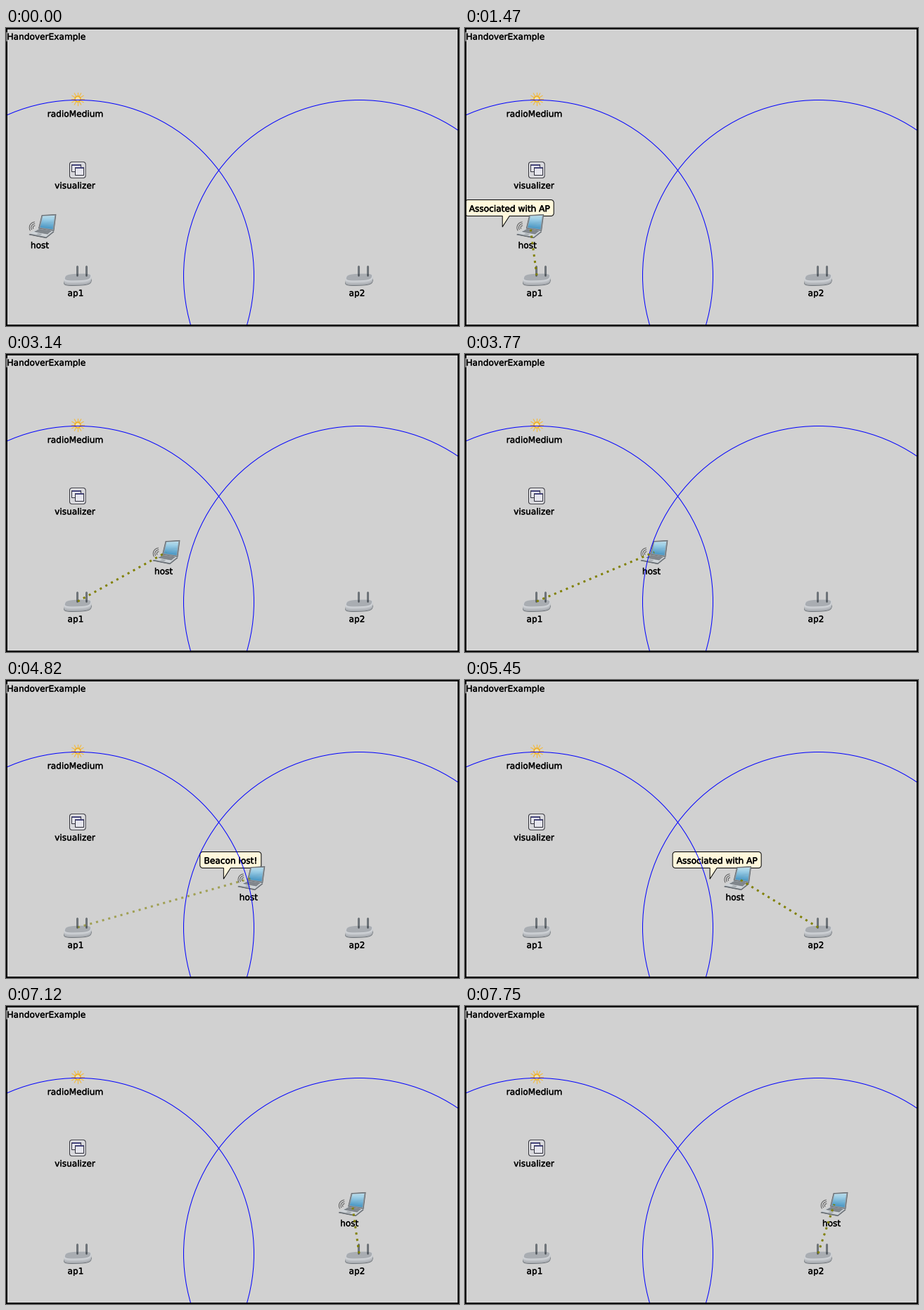
These frames come from a looping animation (644x424 px, 8 s). A matplotlib script:

```python
import numpy as np
import matplotlib.pyplot as plt
from matplotlib.animation import FuncAnimation
from matplotlib.colors import to_rgb
from matplotlib.patches import Circle, Polygon, Rectangle
from matplotlib.patheffects import withStroke
from matplotlib.transforms import Affine2D

W, H, DPI = 644, 424, 100
PX = 72 / DPI
STEP, LOOP = 20, 8000
TICK = 209.4            # ms between redraws of the stage

AP1, AP2, NODE_Y, HOST_Y, RANGE = 102, 502, 352, 282, 250
OLIVE, BLUE, BG = "#808000", "#0000ff", "#d1d1d1"
JOINED, LOST, REJOINED = 1, 7, 8

fig = plt.figure(figsize=(W / DPI, H / DPI), dpi=DPI, facecolor=BG)
ax = fig.add_axes([0, 0, 1, 1])
ax.set_xlim(0, W)
ax.set_ylim(H, 0)
ax.axis("off")
stage = ax.transData


def at(x, y):
    return Affine2D().translate(x, y) + stage


def mix(a, b, f):
    return tuple((1 - f) * np.array(to_rgb(a)) + f * np.array(to_rgb(b)))


def poly(pts, fill, tr, z, edge="none", lw=1.0):
    return ax.add_patch(Polygon(pts, closed=True, fc=fill, ec=edge, lw=lw * PX,
                                joinstyle="round", transform=tr, zorder=z))


def rect(x, y, w, h, fill, tr, z, edge="none", lw=1.0):
    ax.add_patch(Rectangle((x, y), w, h, fc=fill, ec=edge, lw=lw * PX,
                           transform=tr, zorder=z))


def circle(r, fill, edge, lw, tr, z):
    ax.add_patch(Circle((0, 0), r, fc=fill, ec=edge, lw=lw * PX,
                        transform=tr, zorder=z))


def line(xs, ys, color, lw, tr, z, **kw):
    return ax.plot(xs, ys, color=color, lw=lw * PX, transform=tr, zorder=z, **kw)[0]


def label(x, y, text, tr=stage, z=4, ha="center", weight=0.3):
    return ax.text(x, y, text, family="DejaVu Sans", size=12.15 * PX, ha=ha,
                   va="baseline", transform=tr, zorder=z,
                   path_effects=[withStroke(linewidth=weight * PX, foreground="black")])


def arc(cx, cy, r, start, end, n=12):
    a = np.radians(np.linspace(start, end, n))
    return cx + r * np.cos(a), cy + r * np.sin(a)


def round_box(x0, y0, x1, y1, r):
    """Four corner arcs, clockwise from the top right."""
    centers = [(x1 - r, y0 + r), (x1 - r, y1 - r), (x0 + r, y1 - r), (x0 + r, y0 + r)]
    return [np.column_stack(arc(*c, r, 90 * i - 90, 90 * i))
            for i, c in enumerate(centers)]


def patch(quad, s0=0, s1=1, t0=0, t1=1):
    """Part of a four-cornered face, s along its top edge and t down it."""
    tl, tr, br, bl = np.array(quad, float)
    return [(1 - t) * ((1 - s) * tl + s * tr) + t * ((1 - s) * bl + s * br)
            for s, t in ((s0, t0), (s1, t0), (s1, t1), (s0, t1))]


def draw_sun(x, y):
    tr = at(x, y)
    for a in np.arange(12) * np.pi / 6:
        r = np.array([5, 9.3])
        line(r * np.cos(a), r * np.sin(a), "#f2bc45", 1.2, tr, 3)
    circle(3.9, "#ecdcae", "#f0ae22", 1.6, tr, 3)


def draw_window(x, y, w, h, tr):
    rect(x, y, w, h, "#e6e6ee", tr, 3, "#30303c")
    rect(x + 0.5, y + 0.5, w - 1, 2, "#45457c", tr, 3)


def draw_visualizer(x, y):
    tr = at(x, y)
    for r, fill, edge in ((11.3, "#c9c9cf", "#33333a"), (10, "#d6d6da", "#ebebee")):
        poly(np.vstack(round_box(-r, -r, r, r, 3)), fill, tr, 3, edge)
    draw_window(-8.5, -8.5, 13, 10, tr)
    draw_window(-3.5, -4.5, 12, 11.5, tr)


def plate(cy, half_w, half_h):
    a = np.linspace(0, 2 * np.pi, 60)
    c, s = np.cos(a), np.sin(a)
    x = half_w * np.sign(c) * np.abs(c) ** 0.65
    y = half_h * np.sign(s) * np.abs(s) ** 0.65
    return np.column_stack([x - 0.3 * y, cy + y - 0.03 * x])


def draw_ap(x, name):
    tr = at(x, NODE_Y)
    poly(plate(9, 19, 5.3), "#a2a6ab", tr, 2, "#6d7277")
    for f in np.linspace(0, 1, 6):
        poly(plate(8.5 - 5.5 * f, 19, 5.3), mix("#a8acb1", "#d3d6da", f), tr, 2)
    poly(plate(2.5, 18, 4.8), "#a9adb2", tr, 2)
    for dx in (-1, 12.5):
        line([dx, dx], [-13.5, 0], "#50565c", 2.6, tr, 2.2, solid_capstyle="round")
        line([dx - 0.4] * 2, [-13, -3], "#7d848a", 0.8, tr, 2.3)
    label(x - 3, 381.3, name)


def draw_host(tr):
    lid = [(-1, -15.5), (19, -16.7), (16, 6.5), (-5.5, 3)]
    base = [(-5.5, 3), (16, 6.5), (5, 15.3), (-19, 10.5)]
    poly(np.array(base) + (0, 1.5), "#747a80", tr, 3, "#585e64", 0.7)
    poly(base, "#ced3d7", tr, 3)
    for t in (0.1, 0.28, 0.46):
        poly(patch(base, 0.08, 0.9, t, t + 0.14), "#6a7076", tr, 3)
    poly(patch(base, 0.38, 0.62, 0.7, 0.92), "#a5abb0", tr, 3)
    poly(lid, "#8f969c", tr, 3, "#5b6268", 0.8)
    for i in range(8):
        t = 0.07 + 0.105 * i
        poly(patch(lid, 0.08, 0.92, t, t + 0.115), mix("#b5def0", "#4f9cc8", i / 7), tr, 3)
    for r in (2.8, 5.4, 8):
        line(*arc(-10.8, 2, r, 150, 265), "#4d4d4d", 0.9, tr, 3)
    label(-4, 31.3, "host", tr)


draw_sun(102, 101)
label(98.5, 126.3, "radioMedium")
draw_visualizer(101.8, 202)
label(98, 228.3, "visualizer")
draw_ap(AP1, "ap1")
draw_ap(AP2, "ap2")
for cx in (AP1, AP2):
    circle(RANGE, "none", BLUE, 1, at(cx + 0.5, NODE_Y + 0.5), 5)

shift = Affine2D()
draw_host(shift + stage)

link = line([], [], OLIVE, 3, stage, 6, linestyle=(0, (1, 2)), dash_capstyle="butt")
bubble = poly([(0, 0), (1, 0), (1, 1)], "#fff8dc", stage, 2.6, "black")
note = label(0, 261.2, "", z=2.7, weight=0.5)

rect(1, 1, W - 2, H - 2, "none", stage, 9, "black", 2)
rect(0, 6, 2, 13, "#777777", stage, 9)
label(1.5, 16.5, "HandoverExample", z=10, ha="left")


def stop_at(t):
    """Number of the stop the host has reached, on whole redraw ticks."""
    stops = np.floor(7.55 + 2.73 * np.arange(12)) * TICK
    return int(np.sum(t >= stops))


def host_x(k):
    return np.interp(k, [0, 1, 4, 6, 9, 12], [52, 92.7, 228, 310, 426.5, 525])


def show_bubble(x, text, width):
    tip = x - 39.5
    mid = tip + 10
    top, low = 244.5, 267.5
    tr, br, bl, tl = round_box(mid - width / 2, top, mid + width / 2, low, 4)
    tail = [(mid, low), (tip, 283), (tip, low)]
    bubble.set_xy(np.vstack([tr, br, tail, bl, tl]))
    note.set_text(text)
    note.set_x(mid)


def update(frame):
    k = stop_at(frame * STEP + STEP / 2)
    x = host_x(k)
    shift.clear().translate(x, HOST_Y)

    link.set_visible(k >= JOINED)
    link.set_data([AP1 if k < REJOINED else AP2, x], [NODE_Y, HOST_Y])
    link.set_alpha(0.6 if k == LOST else 1)

    shown = k in (JOINED, LOST, REJOINED)
    bubble.set_visible(shown)
    note.set_visible(shown)
    if k == LOST:
        show_bubble(x, "Beacon lost!", 87)
    elif shown:
        show_bubble(x, "Associated with AP", 126)
    return link, bubble, note


anim = FuncAnimation(fig, update, frames=LOOP // STEP, interval=STEP, repeat=True)
plt.show()
```
